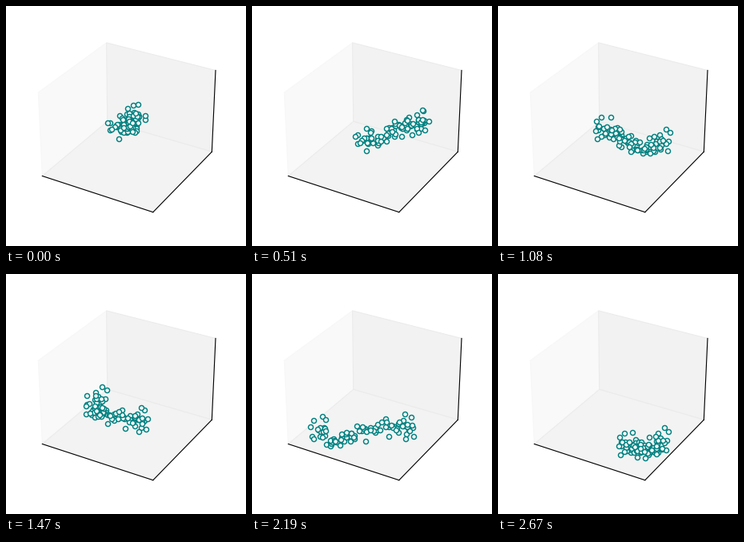
Write a matplotlib script that moves like this. It is 300 px wide and 300 px high and loops after 2.7 s.

```python
import math
import numpy as np
import matplotlib.pyplot as plt
from matplotlib.animation import FuncAnimation

SIZE, DPI = 300, 100
FRAMES, STEP = 90, 30
COUNT = 100
LAG = 360      # ms between the first and the last dot
SPREAD = 4.5   # px around the shared path
PX = 72 / DPI  # points per pixel

# Key points of the path the swarm follows: ms, x, y
PATH = np.array([
    (-360, 140, 153), (-150, 158, 147), (0, 158, 138), (150, 142, 168),
    (360, 186, 152), (540, 220, 145), (720, 212, 168), (840, 182, 177),
    (1080, 127, 153), (1230, 110, 170), (1510, 177, 185), (1760, 90, 176),
    (1920, 97, 207), (2110, 176, 190), (2220, 210, 196), (2430, 190, 219),
    (2670, 156, 212),
], float)
TIMES, POINTS = PATH[:, 0], PATH[:, 1:]
SLOPES = np.gradient(POINTS, TIMES, axis=0)


def path(t):
    """Smooth curve through the key points at an array of times."""
    i = np.clip(np.searchsorted(TIMES, t, side="right") - 1, 0, len(TIMES) - 2)
    span = (TIMES[i + 1] - TIMES[i])[:, None]
    u = (t - TIMES[i])[:, None] / span
    return ((1 + 2 * u) * (1 - u) ** 2 * POINTS[i]
            + u * (1 - u) ** 2 * span * SLOPES[i]
            + u * u * (3 - 2 * u) * POINTS[i + 1]
            + u * u * (u - 1) * span * SLOPES[i + 1])


rng = np.random.default_rng(5)
delay = rng.permutation(np.linspace(0, LAG, COUNT))
offset = np.clip(rng.standard_t(5, (COUNT, 2)), -3.5, 3.5) * SPREAD


def project(x, y, z):
    """Stage position of a box point with coordinates from -1 to 1."""
    x, y, z = np.array([x, y, z]) * [4, 4, 3] / math.sqrt(41) * 0.953
    azim, elev = math.radians(-60), math.radians(30)
    near = x * math.cos(azim) + y * math.sin(azim)
    right = y * math.cos(azim) - x * math.sin(azim)
    up = z * math.cos(elev) - near * math.sin(elev)
    depth = near * math.cos(elev) + z * math.sin(elev)
    scale = 1332 / (10 - depth)
    return 153.3 + right * scale, 146.7 - up * scale


BACK_TOP, BACK = project(-1, 1, 1), project(-1, 1, -1)
LEFT_TOP, LEFT = project(-1, -1, 1), project(-1, -1, -1)
RIGHT_TOP, RIGHT = project(1, 1, 1), project(1, 1, -1)
FRONT = project(1, -1, -1)

fig = plt.figure(figsize=(SIZE / DPI, SIZE / DPI), dpi=DPI, facecolor="white")
ax = fig.add_axes([0, 0, 1, 1])
ax.set_xlim(0, SIZE)
ax.set_ylim(SIZE, 0)
ax.axis("off")


def pane(corners, face, edge):
    ax.add_patch(plt.Polygon(corners, facecolor=face, edgecolor=edge,
                             linewidth=PX))


pane([BACK_TOP, BACK, LEFT, LEFT_TOP], "#f9f9f9", "#f7f7f7")
pane([BACK_TOP, RIGHT_TOP, RIGHT, BACK], "#f2f2f2", "#ebebeb")
pane([BACK, RIGHT, FRONT, LEFT], "#f3f3f3", "#ebebeb")
for start, end in [(LEFT, FRONT), (FRONT, RIGHT), (RIGHT, RIGHT_TOP)]:
    ax.plot(*zip(start, end), color="black", linewidth=0.8)

dots, = ax.plot([], [], "o", markersize=6 * PX, markerfacecolor="white",
                markeredgecolor="teal", markeredgewidth=1.5 * PX)


def update(frame):
    dots.set_data(*(path(frame * STEP - delay) + offset).T)
    return dots,


anim = FuncAnimation(fig, update, frames=FRAMES, interval=STEP,
                     repeat=True, repeat_delay=0)
plt.show()
```
